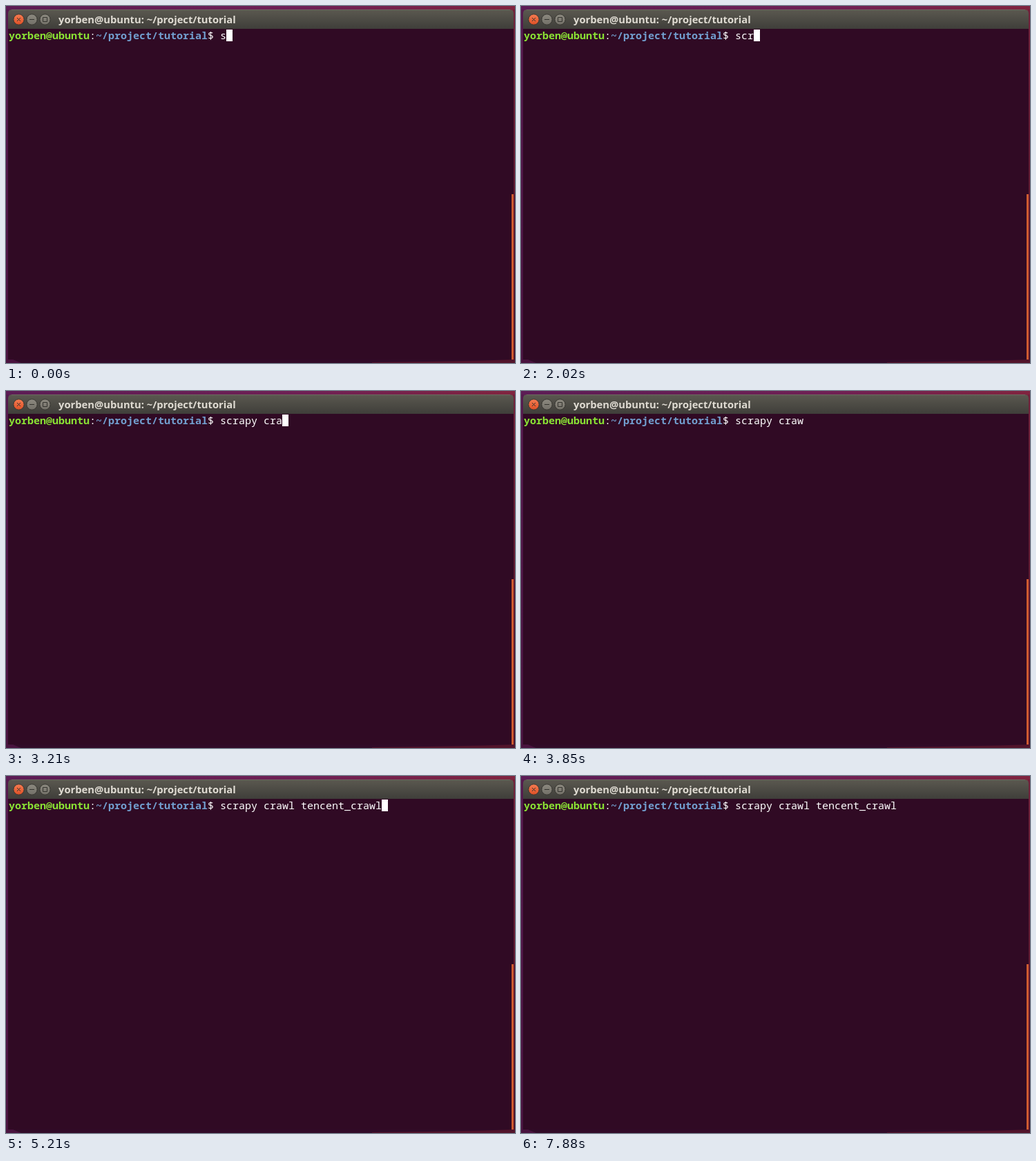
Recreate the animation shown at these times as an HTML page. Size 737x516 px, loop 8000 ms.

```html
<!DOCTYPE html>
<html lang="en">
<head>
<meta charset="utf-8">
<title>Terminal</title>
<style>
  html, body { margin: 0; width: 100%; height: 100%; overflow: hidden; background: #300a24; }
  svg { display: block; }
  text { white-space: pre; }
  .title { font: 600 14.75px "Noto Sans", "Open Sans", sans-serif; fill: #dfdbd2; }
  .term { font: 15px "Noto Sans Mono", "DejaVu Sans Mono", monospace; fill: #fff; }
  .user { font-weight: 700; fill: #8ae234; }
  .path { font-weight: 700; fill: #729fcf; }
</style>
</head>
<body>
<svg width="737" height="516" viewBox="0 0 737 516">
  <defs>
    <linearGradient id="top">
      <stop offset="0" stop-color="#5c1c55"/>
      <stop offset=".6" stop-color="#6f2054"/>
      <stop offset="1" stop-color="#80243f"/>
    </linearGradient>
    <linearGradient id="left" x2="0" y2="1">
      <stop offset="0" stop-color="#551a4e"/>
      <stop offset="1" stop-color="#49133f"/>
    </linearGradient>
    <linearGradient id="right" x2="0" y2="1">
      <stop offset="0" stop-color="#702039"/>
      <stop offset="1" stop-color="#4d1229"/>
    </linearGradient>
    <linearGradient id="bar" x2="0" y2="1">
      <stop offset="0" stop-color="#5b5950"/>
      <stop offset="1" stop-color="#3e3d39"/>
    </linearGradient>
    <linearGradient id="close" x2="0" y2="1">
      <stop offset="0" stop-color="#f47c52"/>
      <stop offset="1" stop-color="#de5026"/>
    </linearGradient>
    <linearGradient id="grey" x2="0" y2="1">
      <stop offset="0" stop-color="#8c897f"/>
      <stop offset="1" stop-color="#737068"/>
    </linearGradient>
  </defs>

  <!-- desktop edges -->
  <rect width="737" height="34" fill="url(#top)"/>
  <rect y="5" width="4" height="511" fill="url(#left)"/>
  <rect x="734" y="5" width="3" height="511" fill="url(#right)"/>
  <rect y="511" width="737" height="5" fill="#310b28"/>
  <path d="M0 511H10L22 516H0Z" fill="#49133f"/>
  <path d="M530 515L610 514L690 512.5L737 511V516H530Z" fill="#52142b"/>

  <!-- window -->
  <path d="M3 34V11Q3 5 9 5H729Q735 5 735 11V34Z" fill="url(#bar)"/>
  <path d="M8 5.5H730" stroke="#6b695f"/>
  <rect x="3" y="33" width="732" height="478" fill="#300a24"/>
  <rect x="732" y="272" width="3" height="239" fill="#cf5a30"/>
  <g stroke="#35342f">
    <circle cx="18.5" cy="19.5" r="7.7" fill="url(#close)"/>
    <circle cx="37.5" cy="19.5" r="7.7" fill="url(#grey)"/>
    <circle cx="56.5" cy="19.5" r="7.7" fill="url(#grey)"/>
    <path d="M16 17l5 5m0-5l-5 5M34 19.5h7M53.5 16.5h6v6h-6z" fill="none"/>
  </g>
  <text class="title" x="76" y="25">yorben@ubuntu: ~/project/tutorial</text>

  <text class="term" x="4" y="48"><tspan class="user">yorben@ubuntu</tspan>:<tspan class="path">~/project/tutorial</tspan>$</text>
  <text class="term" id="typed" x="310" y="48"></text>
  <rect id="cursor" width="9" height="17" fill="#fff"/>
</svg>
<script>
  const LOOP = 8000, CELL = 9, START = 310;
  const COMMAND = "scrapy crawl tencent_crawl";
  const typed = document.getElementById("typed");
  const cursor = document.getElementById("cursor");

  // [time in ms, characters typed]
  const keys = [
    [0, 1], [310, 2], [840, 1], [1090, 0], [1620, 1], [1740, 2], [2020, 3],
    [2140, 4], [2260, 5], [2410, 6], [2560, 7], [2810, 8], [3060, 9],
    [3210, 10], [3330, 11], [4160, 12], [4280, 13], [5210, COMMAND.length]
  ];
  // spans in which the cursor is hidden
  const blinks = [[3850, 4160], [5490, 6080], [6670, 7320], [7880, LOOP]];
  const ENTER = 7320;

  function draw(now) {
    const t = now % LOOP;
    const count = keys.filter(([time]) => time <= t).pop()[1];
    const entered = t >= ENTER;
    const hidden = blinks.some(([from, to]) => t >= from && t < to);
    typed.textContent = COMMAND.slice(0, count);
    cursor.setAttribute("x", entered ? 4 : START + count * CELL);
    cursor.setAttribute("y", entered ? 51 : 34);
    cursor.setAttribute("visibility", hidden ? "hidden" : "visible");
  }

  const begin = performance.now();
  function tick() {
    draw(performance.now() - begin);
    requestAnimationFrame(tick);
  }
  tick();
</script>
</body>
</html>
```
